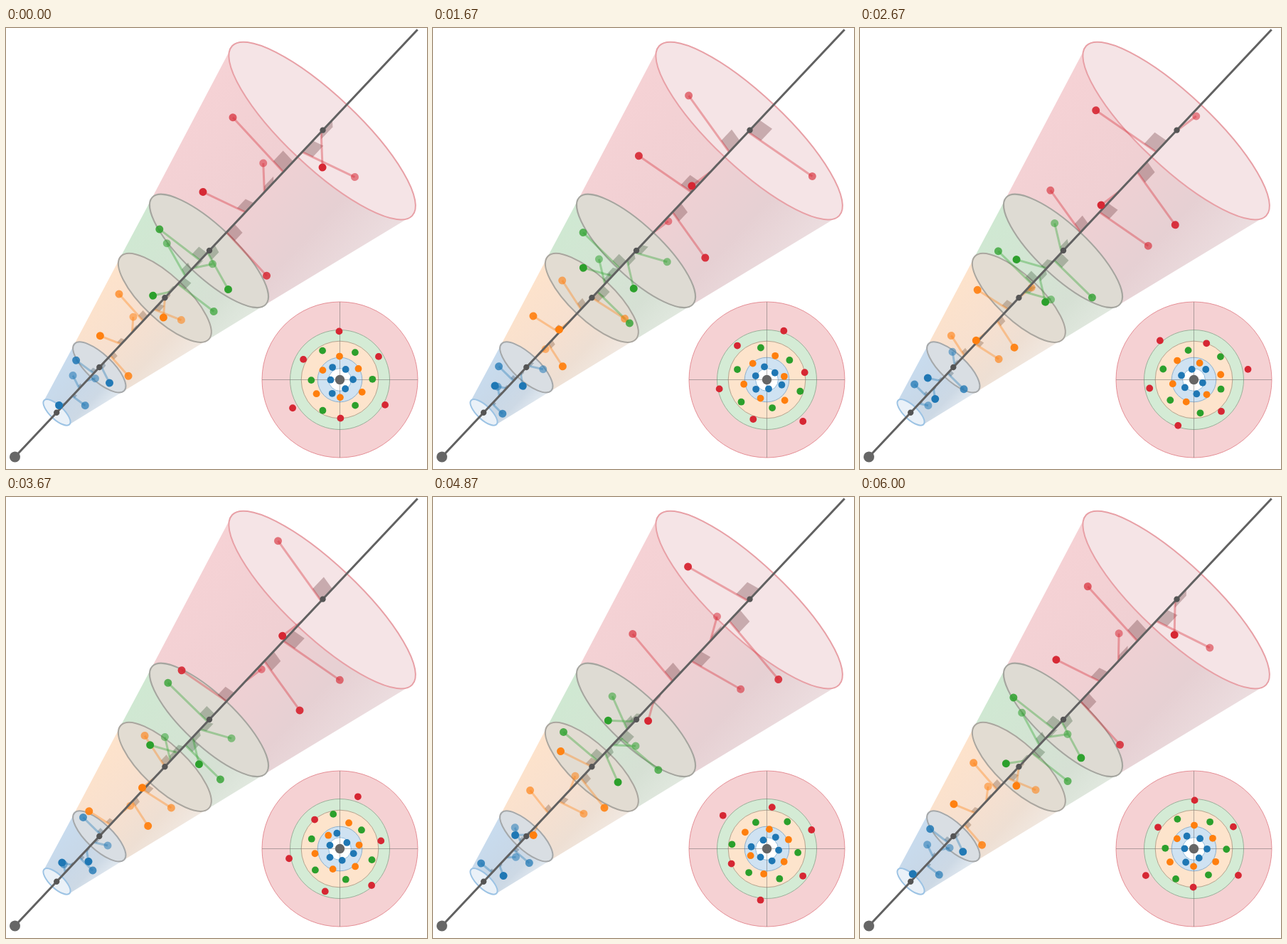
These frames come from a looping animation (592 px wide and 620 px high, 6070 ms). An HTML page with a canvas:

```html
<!DOCTYPE html>
<html lang="en">
<head>
<meta charset="utf-8">
<title>Helical rings in a cone</title>
<style>
html, body { margin: 0; width: 100%; height: 100%; overflow: hidden; background: #fff; }
canvas { display: block; }
</style>
</head>
<body>
<canvas id="stage" width="592" height="620"></canvas>
<script>
const ctx = document.getElementById('stage').getContext('2d');
const TAU = Math.PI * 2, RAD = Math.PI / 180;
const LOOP = 6070, STEP = 4, MAX_TURN = 358.2;
const SCALE = 1.571;      // inset radius to cone radius
const VIEW_TURN = 76.1;   // angle between inset and cone
const INSET = [469.5, 494.5];

// Rings along the axis: distance s, half axes a (across) and b (along), inset radius r
const rings = [
  { s: 86, a: 24.6, b: 9.6, r: 15.9, face: '#eaf1f8', line: '#9cc3e4' },
  { s: 173.2, a: 48, b: 18.2, r: 31.3, face: '#d9dee3', line: '#a5a8aa' },
  { s: 307.4, a: 85, b: 30.6, r: 54.3, face: '#e2dcd2', line: '#aaa69f' },
  { s: 398, a: 109.7, b: 35.5, r: 70, face: '#dedbd3', line: '#a5a59f' },
  { s: 630, a: 174, b: 50.5, r: 109.5, face: '#f5e4e6', line: '#e8a0a6' }
];
const beads = [85.6, 173.2, 307.5, 398.7, 631.3];

// Layers between neighbouring rings; slots give each dot's place in sixths of a turn
const slotsA = [3, 5, 1, 0, 2, 4], slotsB = [4, 2, 0, 1, 5, 3];
const layers = [
  { color: '#1f77b4', body: ['#c8dcef', '#c8d8e8', '#cdd9e5', '#e3eaf1'], flat: '#cfe2f2',
    edge: '#8fb0cc', slots: slotsA, base: 0.85, tilt: 0.385, shift: 2.9 },
  { color: '#ff7f0e', body: ['#fee3cb', '#f7e0cf', '#eedfd3', '#f1e9e2'], flat: '#fde4cc',
    edge: '#b5a48f', slots: slotsB, base: 30.9, tilt: 0.375, shift: 0 },
  { color: '#2ca02c', body: ['#cfe9d2', '#d3e4d3', '#d6e0d4', '#e2e9e0'], flat: '#d4ebd5',
    edge: '#9bb09a', slots: slotsA, base: 0.85, tilt: 0.336, shift: -3.8 },
  { color: '#d62733', body: ['#f6d2d5', '#f0d0d3', '#e6d0d3', '#ecdee0'], flat: '#f5d1d3',
    edge: '#e58f96', slots: slotsB, base: 30.9, tilt: 0.3, shift: -3.5 }
];

function disc(x, y, r, fill, stroke) {
  ctx.beginPath();
  ctx.arc(x, y, r, 0, TAU);
  ctx.fillStyle = fill;
  ctx.fill();
  if (stroke) {
    ctx.strokeStyle = stroke;
    ctx.lineWidth = 1;
    ctx.stroke();
  }
}

function line(x1, y1, x2, y2, color, width) {
  ctx.beginPath();
  ctx.moveTo(x1, y1);
  ctx.lineTo(x2, y2);
  ctx.strokeStyle = color;
  ctx.lineWidth = width;
  ctx.stroke();
}

function ringFace({ s, a, b, face, line }) {
  ctx.beginPath();
  ctx.ellipse(s, 0, b, a, 0, 0, TAU);
  ctx.fillStyle = face;
  ctx.fill();
  ctx.strokeStyle = line;
  ctx.lineWidth = 2;
  ctx.stroke();
}

function frustum(near, far, stops) {
  const g = ctx.createLinearGradient(0, -far.a, 0, far.a);
  [0, 0.45, 0.75, 1].forEach((at, i) => g.addColorStop(at, stops[i]));
  ctx.beginPath();
  ctx.ellipse(far.s, 0, far.b, far.a, 0, -Math.PI / 2, Math.PI / 2);
  ctx.ellipse(near.s, 0, near.b, near.a, 0, Math.PI / 2, Math.PI * 1.5);
  ctx.closePath();
  ctx.fillStyle = g;
  ctx.fill();
}

function dotsOf(layer, i, turn) {
  const lo = rings[i], hi = rings[i + 1];
  return layer.slots.map((slot, k) => {
    const f = (k + 1) / 6;
    const r = (lo.r + (hi.r - lo.r) * f) * Math.SQRT1_2;
    const theta = (layer.base + slot * 60 + turn) * RAD;
    const phi = theta + VIEW_TURN * RAD;
    const foot = beads[i] + (beads[i + 1] - beads[i]) * f + layer.shift;
    return {
      color: layer.color, foot, r, theta, depth: Math.sin(phi),
      ds: SCALE * r * layer.tilt * Math.sin(phi),
      p: SCALE * r * Math.cos(phi)
    };
  });
}

// Radius line with its right-angle mark
function arm({ foot, ds, p, r, color }) {
  const q = 0.2, h = q * SCALE * r * 0.95;
  ctx.beginPath();
  ctx.moveTo(foot, 0);
  ctx.lineTo(foot + h, 0);
  ctx.lineTo(foot + h + ds * q, p * q);
  ctx.lineTo(foot + ds * q, p * q);
  ctx.closePath();
  ctx.globalAlpha = 0.12;
  ctx.fillStyle = color;
  ctx.fill();
  ctx.globalAlpha = 0.24;
  ctx.fillStyle = '#444';
  ctx.fill();
  ctx.globalAlpha = 0.36;
  line(foot, 0, foot + ds, p, color, 3);
  ctx.globalAlpha = 1;
}

function bead({ foot, ds, p, depth, color }) {
  ctx.globalAlpha = Math.min(1, Math.max(0.52, 0.77 - 0.3 * depth));
  disc(foot + ds, p, 5.5, color);
  ctx.globalAlpha = 1;
}

function drawCone(dots) {
  // x runs along the axis, y across it
  ctx.setTransform(0.6859, -0.7277, 0.7277, 0.6859, 12.5, 603);
  for (let i = 3; i >= 0; i--) {
    frustum(rings[i], rings[i + 1], layers[i].body);
    ringFace(rings[i + 1]);
  }
  ringFace(rings[0]);
  dots.forEach(arm);
  dots.filter(d => d.depth >= 0).forEach(bead);
  line(0, 0, 825.5, 0, '#616161', 3);
  beads.forEach(s => disc(s, 0, 4.2, '#555'));
  dots.filter(d => d.depth < 0).forEach(bead);
  disc(0, 0, 7.5, '#666');
}

function drawInset(dots) {
  ctx.setTransform(1, 0, 0, 1, ...INSET);
  for (let i = 3; i >= 0; i--) disc(0, 0, rings[i + 1].r, layers[i].flat, layers[i].edge);
  disc(0, 0, rings[0].r, '#fff', '#8fbbdd');
  const R = rings[4].r;
  line(-R, 0, R, 0, 'rgba(90,90,90,.45)', 1);
  line(0, -R, 0, R, 'rgba(90,90,90,.45)', 1);
  dots.forEach(d => disc(d.r * Math.cos(d.theta), -d.r * Math.sin(d.theta), 4.9, d.color));
  disc(0, 0, 6.7, '#666');
}

function draw(now) {
  const tick = Math.floor(((now % LOOP) + 4) * 0.015);
  const turn = tick > 90 ? 0 : Math.min(tick * STEP, MAX_TURN);
  const dots = layers.flatMap((layer, i) => dotsOf(layer, i, turn));
  ctx.setTransform(1, 0, 0, 1, 0, 0);
  ctx.fillStyle = '#fff';
  ctx.fillRect(0, 0, 592, 620);
  drawCone(dots);
  drawInset(dots);
}

let start;
function loop(now) {
  start ??= now;
  draw(Math.max(0, now - start));
  requestAnimationFrame(loop);
}
draw(0);
requestAnimationFrame(loop);
</script>
</body>
</html>
```
